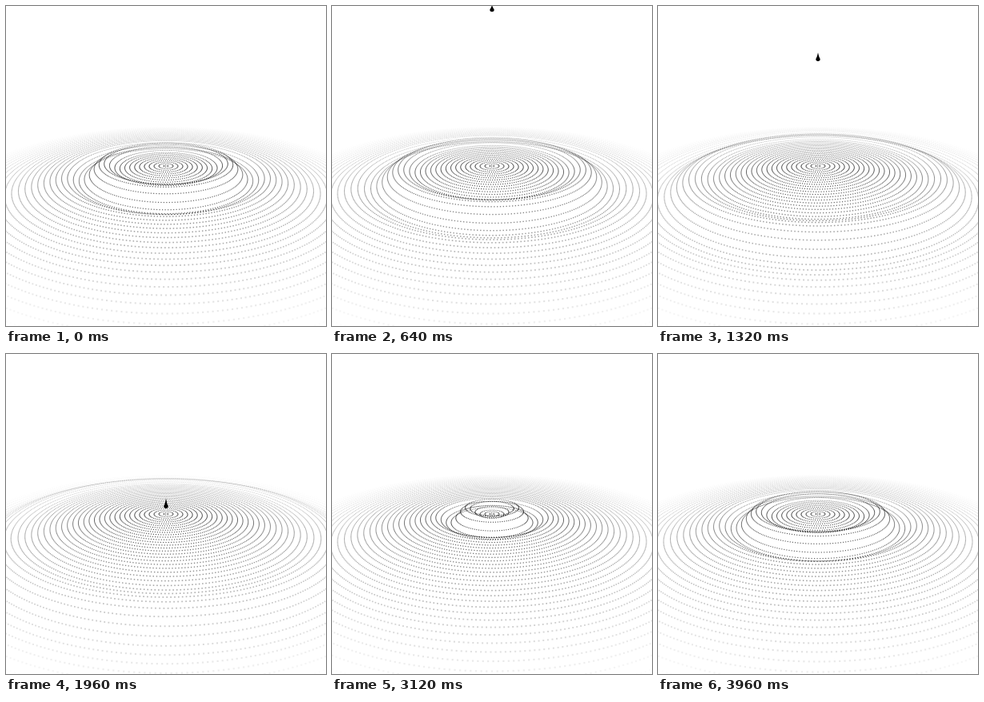
An HTML page with a canvas for the animation above (4000 ms loop, 400 px wide and 400 px high).

```html
<!DOCTYPE html>
<html lang="en">
<head>
<meta charset="utf-8">
<title>Ripple</title>
<style>
html, body { margin: 0; width: 100%; height: 100%; overflow: hidden; background: #fff; }
canvas { display: block; width: 400px; height: 400px; }
</style>
</head>
<body>
<canvas id="stage" width="400" height="400"></canvas>
<script>
const ctx = document.getElementById('stage').getContext('2d');
const LOOP = 4000;
const MID = 200;
const DEPTH = MID / Math.tan(Math.PI / 6);
const TILT = Math.PI / 9;
const SIN = Math.sin(TILT);
const COS = Math.cos(TILT);
const RINGS = 40;
const STEP = 6;
const REACH = RINGS * STEP;
const GAP = 2.6;
const DOT = 0.9;
const SPEED = 0.06;
const WAVE_START = 1950;
const DROP_START = 400;
const FALL = 1600;

// Dots sit at an even distance along every ring.
const rings = Array.from({ length: RINGS }, (_, i) => {
  const r = (i + 0.5) * STEP;
  const count = Math.round(2 * Math.PI * r / GAP);
  const dots = Array.from({ length: count }, (_, j) => {
    const a = j / count * 2 * Math.PI;
    return [r * Math.cos(a), r * Math.sin(a)];
  });
  return { r, dots };
});

// One packet: a trough followed by a crest, widening as it travels.
function packet(r, age) {
  const front = SPEED * age;
  const u = (front - r) / (43 + 0.18 * front);
  if (u <= 0 || u >= 1) return 0;
  return -Math.sin(2 * Math.PI * u) * Math.sin(Math.PI * u);
}

function height(r, t) {
  const age = (t - WAVE_START + LOOP) % LOOP;
  const amp = 12.5 * (1 - (r / REACH) ** 2);
  return amp * (packet(r, age) + packet(r, age + LOOP));
}

function drawRing({ r, dots }, t) {
  const h = height(r, t);
  ctx.fillStyle = `rgba(0,0,0,${1 - r / REACH})`;
  for (const [px, pz] of dots) {
    const scale = DEPTH / (DEPTH - pz * COS - h * SIN);
    const x = MID + px * scale;
    const y = MID + (pz * SIN - h * COS) * scale;
    const size = DOT * scale;
    if (x > -2 && x < 402 && y < 402) {
      ctx.fillRect(x - size / 2, y - size / 2, size, size);
    }
  }
}

function drawDrop(t) {
  if (t > 2120) return;
  const f = Math.max(0, (t - DROP_START) / FALL);
  const grow = Math.min(1, t / 340);
  const y = MID * f * f;
  const rad = 2.7 * grow;
  const tip = (5.3 + 4.6 * f) * grow;
  ctx.save();
  ctx.beginPath();
  ctx.rect(0, 0, 400, MID);
  ctx.clip();
  ctx.fillStyle = '#000';
  ctx.beginPath();
  ctx.moveTo(MID, y - tip);
  ctx.quadraticCurveTo(MID + rad * 0.3, y - tip * 0.4, MID + rad, y);
  ctx.arc(MID, y, rad, 0, Math.PI);
  ctx.quadraticCurveTo(MID - rad * 0.3, y - tip * 0.4, MID, y - tip);
  ctx.fill();
  ctx.restore();
}

function draw(t) {
  ctx.fillStyle = '#fff';
  ctx.fillRect(0, 0, 400, 400);
  for (const ring of rings) drawRing(ring, t);
  drawDrop(t);
}

const begin = performance.now();
function tick() {
  draw((performance.now() - begin) % LOOP);
  requestAnimationFrame(tick);
}
tick();
</script>
</body>
</html>
```
